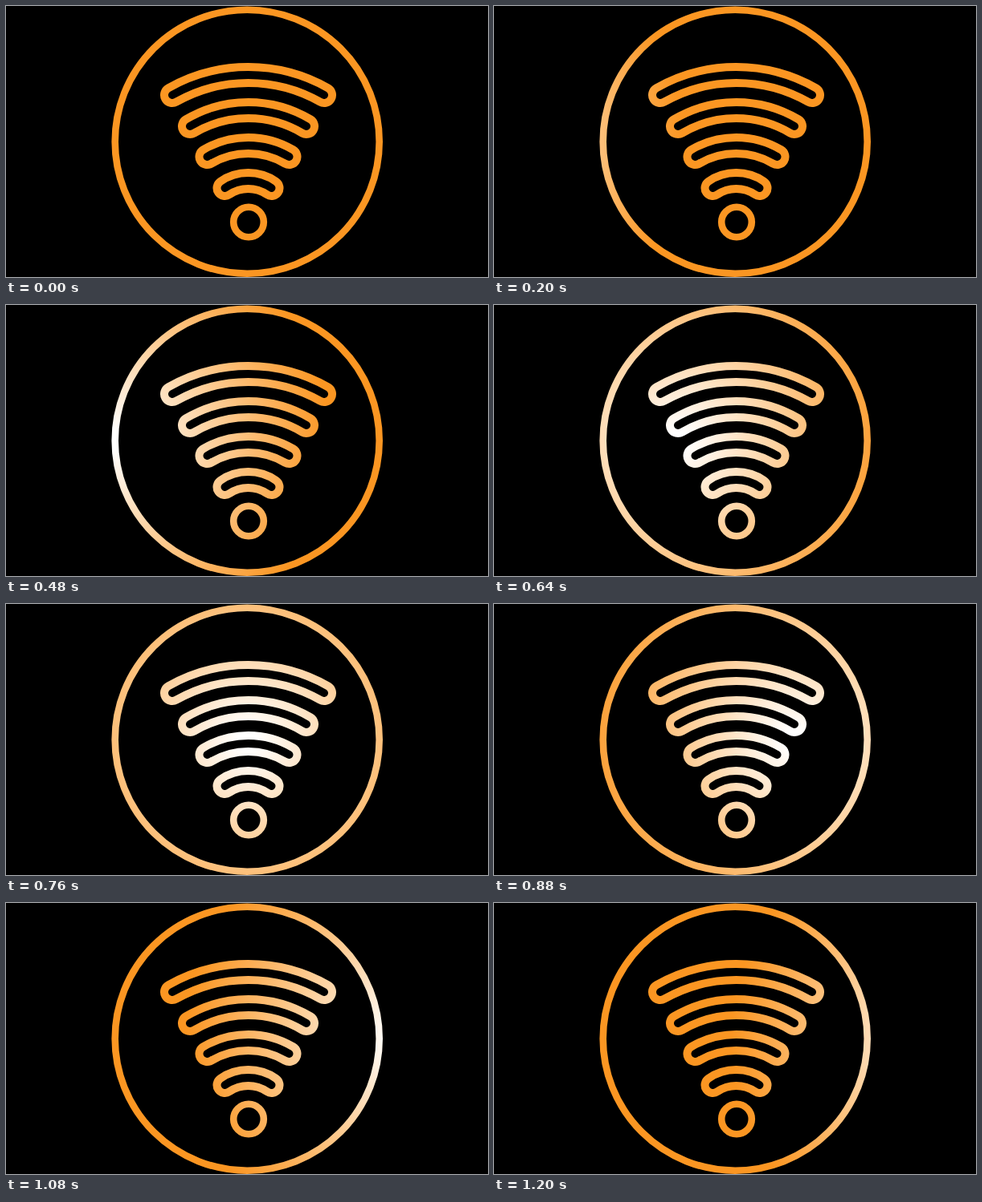
Write an HTML page that moves like this. It is 600 px wide and 338 px high and loops after 1240 ms.

```html
<!DOCTYPE html>
<html lang="en">
<head>
<meta charset="utf-8">
<title>Signal shine</title>
<style>
  html, body { margin: 0; width: 100%; height: 100%; overflow: hidden; background: #000; }
  svg { display: block; width: 600px; height: 338px; }
</style>
</head>
<body>
<svg viewBox="0 0 600 338" width="600" height="338">
  <defs>
    <radialGradient id="shine" gradientUnits="userSpaceOnUse" cx="0" cy="169" r="270">
      <stop offset="0" stop-color="#fff"/>
      <stop offset="0.04" stop-color="#fff"/>
      <stop offset="1" stop-color="#fb9622"/>
    </radialGradient>
    <mask id="icon" maskUnits="userSpaceOnUse" x="0" y="0" width="600" height="338">
      <g fill="none" stroke="#fff" stroke-width="8.6">
        <circle cx="300.2" cy="169.2" r="164.5"/>
        <circle cx="302" cy="269.5" r="18.8"/>
      </g>
      <g id="bars" fill="none" stroke-linecap="round"></g>
    </mask>
  </defs>
  <rect width="600" height="338" fill="#000"/>
  <rect width="600" height="338" fill="url(#shine)" mask="url(#icon)"/>
</svg>
<script>
  const LOOP = 1240, STEP = 40;
  const MID = 301.5;
  const shine = document.getElementById('shine');
  const bars = document.getElementById('bars');

  function addStroke(d, color, width) {
    const path = document.createElementNS('http://www.w3.org/2000/svg', 'path');
    path.setAttribute('d', d);
    path.setAttribute('stroke', color);
    path.setAttribute('stroke-width', width);
    bars.appendChild(path);
  }

  // A curved capsule outline: a wide arc with a narrow arc cut out.
  function addBar(half, top, sag) {
    const r = (half * half + sag * sag) / (2 * sag);
    const y = top + sag;
    const d = `M${MID - half} ${y}A${r} ${r} 0 0 1 ${MID + half} ${y}`;
    addStroke(d, '#fff', 30);
    addStroke(d, '#000', 10);
  }

  addBar(94.5, 86, 25);
  addBar(72.5, 130, 20);
  addBar(51, 174, 14);
  addBar(29, 218, 9);

  function draw(ms) {
    const t = Math.floor((ms % LOOP) / STEP) * STEP;
    shine.setAttribute('cx', 301 + (t - 760) * 0.6);
  }

  const start = performance.now();
  function tick() {
    draw(performance.now() - start);
    requestAnimationFrame(tick);
  }
  tick();
</script>
</body>
</html>
```
